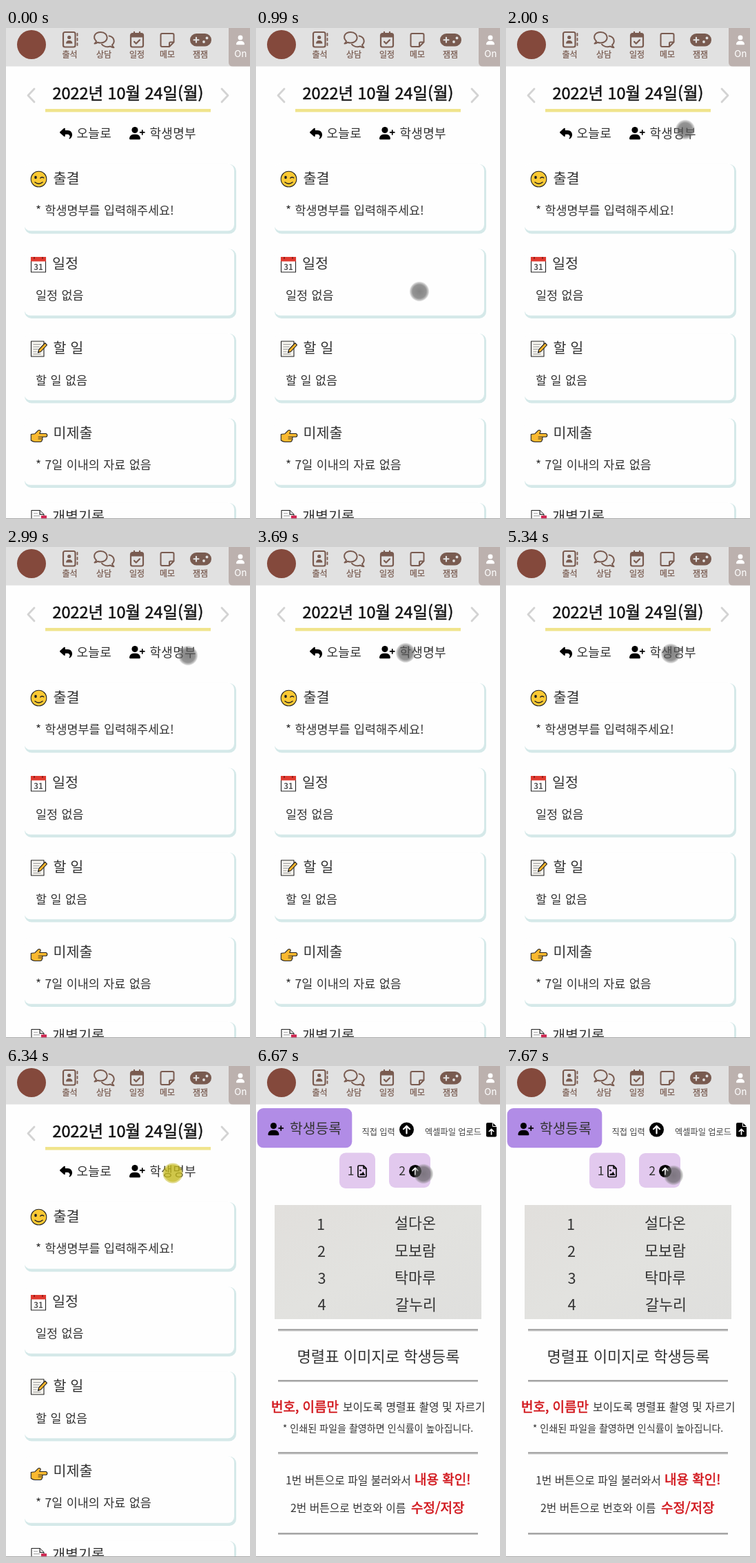
An HTML page that plays this animation: 354x710 px, repeating every 8000 ms.

```html
<!DOCTYPE html>
<html lang="ko">
<head>
<meta charset="utf-8">
<title>학급 일지</title>
<style>
html, body { margin: 0; width: 100%; height: 100%; overflow: hidden; background: #fefefe; }
svg { display: block; width: 354px; height: 710px; }
text { font-family: "Noto Sans CJK KR", "Noto Sans CJK", "Noto Sans CJK JP", sans-serif; font-weight: 300; fill: #333; }
.mid { text-anchor: middle; }
.nav text { font-size: 12px; font-weight: 400; fill: #795b50; stroke: #795b50; stroke-width: .25; text-anchor: middle; }
.nav .on { font-size: 13.5px; font-weight: 300; fill: #fff; stroke: none; }
.line { fill: none; stroke: #795b50; stroke-width: 2.2; stroke-linecap: round; stroke-linejoin: round; }
.brown { fill: #795b50; }
.date { font-size: 23.4px; font-weight: 400; fill: #111; stroke: #111; stroke-width: .5; text-anchor: middle; }
.link { font-size: 18px; letter-spacing: .3px; }
.head { font-size: 20.7px; }
.body { font-size: 17.4px; word-spacing: .6px; }
.small { font-size: 12.2px; fill: #444; }
.note { font-size: 15.8px; }
.red { font-size: 19px; font-weight: 400; fill: #d2181e; stroke: #d2181e; stroke-width: .6; }
.row { font-size: 21.7px; font-weight: 400; text-anchor: middle; }
.ink { stroke: #222; stroke-width: 1.1; stroke-linejoin: round; }

.home, .roster, .cursor, .idle, .press { animation: 8s step-end infinite; }
.home { animation-name: home; }
.roster { animation-name: roster; }
.cursor { animation-name: move; }
.idle { animation-name: idle; }
.press { animation-name: press; }
@keyframes home { 0% { visibility: visible } 83.375%, 100% { visibility: hidden } }
@keyframes roster { 0% { visibility: hidden } 83.375%, 100% { visibility: visible } }
@keyframes idle { 0% { opacity: 1 } 79.25% { opacity: 0 } 83.375%, 100% { opacity: 1 } }
@keyframes press { 0% { opacity: 0 } 79.25% { opacity: 1 } 83.375%, 100% { opacity: 0 } }
@keyframes move {
  0% { opacity: 0; transform: translate(237px, 381px) }
  12.375% { opacity: 1; transform: translate(237px, 381px) }
  16.5% { opacity: 1; transform: translate(266px, 115px) }
  25% { opacity: 1; transform: translate(260px, 147px) }
  29.125% { opacity: 1; transform: translate(215px, 171px) }
  33.25% { opacity: 1; transform: translate(201px, 150px) }
  37.375% { opacity: 1; transform: translate(264px, 157px) }
  42% { opacity: 1; transform: translate(225px, 176px) }
  46.125% { opacity: 1; transform: translate(217px, 153px) }
  50.25% { opacity: 1; transform: translate(254px, 159px) }
  54.375% { opacity: 1; transform: translate(204px, 165px) }
  58.5% { opacity: 1; transform: translate(255px, 141px) }
  62.625% { opacity: 1; transform: translate(231px, 173px) }
  66.75% { opacity: 1; transform: translate(239px, 154px) }
  70.875% { opacity: 1; transform: translate(243px, 156px) }
  79.25% { opacity: 1; transform: translate(242px, 155px) }
  83.375% { opacity: 1; transform: translate(243px, 156px) }
  95.875%, 100% { opacity: 1; transform: translate(243px, 158px) }
}
</style>
</head>
<body>
<svg viewBox="0 0 354 710">
  <defs>
    <g id="user">
      <circle cx="224" cy="128" r="128"/>
      <path d="M0 482C0 384 80 304 178 304h92C368 304 448 384 448 482c0 17-13 30-30 30H30C13 512 0 499 0 482z"/>
    </g>
    <g id="userPlus">
      <use href="#user"/>
      <path d="M440 224H616M528 136V312" fill="none" stroke="#000" stroke-width="48" stroke-linecap="round"/>
    </g>
    <g id="card">
      <rect x="27" y="197" width="307" height="100.500" rx="10" fill="#d5e9e9"/>
      <rect x="26.500" y="196.500" width="304.500" height="96.800" rx="9" fill="#fefefe"/>
    </g>
    <g id="up">
      <circle r="10.500"/>
      <path d="M0 5.500V-5M-4.500 -.8L0 -5.300L4.500 -.8" fill="none" stroke="#fff" stroke-width="2.200" stroke-linecap="round" stroke-linejoin="round"/>
    </g>
    <g id="rule">
      <rect x="32" y="-1.500" width="290" height="3" fill="#c6c6c6"/>
      <rect x="32" y="-1.500" width="290" height="1.500" fill="#999"/>
    </g>
    <linearGradient id="paper" x2="1" y2="1">
      <stop stop-color="#e1dfdc"/><stop offset=".5" stop-color="#e2e2df"/><stop offset="1" stop-color="#dfdfdd"/>
    </linearGradient>
    <radialGradient id="spot">
      <stop stop-color="#555" stop-opacity=".72"/><stop offset=".7" stop-color="#5c5c5c" stop-opacity=".66"/>
      <stop offset=".85" stop-color="#777" stop-opacity=".5"/><stop offset="1" stop-color="#888" stop-opacity=".15"/>
    </radialGradient>
  </defs>

  <rect width="354" height="710" fill="#fefefe"/>

  <g class="home">
    <g fill="none" stroke="#d3d3d3" stroke-width="2.800" stroke-linecap="round" stroke-linejoin="round">
      <path d="M41 88L32 97.500L41 107"/>
      <path d="M313 88L322 97.500L313 107"/>
    </g>
    <text class="date" x="177" y="103.300">2022년 10월 24일(월)</text>
    <rect x="57" y="117" width="240" height="4.500" fill="#f0e48c"/>
    <path transform="translate(78 143.500) scale(.0352)" d="M205 35c12 5 19 16 19 29v64H336c97 0 176 79 176 176c0 113-82 164-100 174c-16 7-28-5-28-18c0-8 4-14 10-19c9-9 22-27 22-57c0-53-43-96-96-96H224v64c0 13-7 24-19 29s-25 3-34-5l-160-144C4 226 0 217 0 208s4-18 11-24l160-144c9-8 22-10 34-5z"/>
    <text class="link" x="102.500" y="158.800">오늘로</text>
    <use href="#userPlus" transform="translate(179 143) scale(.0355)"/>
    <text class="link" x="208.500" y="158.800">학생명부</text>

    <use href="#card"/>
    <use href="#card" y="122.500"/>
    <use href="#card" y="245"/>
    <use href="#card" y="367.500"/>
    <use href="#card" y="490"/>

    <!-- wink -->
    <circle class="ink" cx="47.500" cy="218.500" r="11.300" fill="#fbc934"/>
    <ellipse cx="43" cy="216" rx="1.800" ry="2.300" fill="#222"/>
    <path d="M49.800 217q2.500 -2.300 5 -.3M42 223q5.500 4.500 11 0" fill="none" stroke="#222" stroke-width="1.400" stroke-linecap="round"/>
    <text class="head" x="68.500" y="225">출결</text>
    <text class="body" x="43" y="270.300">* 학생명부를 입력해주세요!</text>

    <!-- calendar -->
    <rect class="ink" x="36.500" y="331.500" width="21" height="21.500" fill="#fff"/>
    <path d="M36 331h22v6.500h-22z" fill="#e0392f"/>
    <path d="M41 331v3M53 331v3" stroke="#7d1712" stroke-width="1.500"/>
    <text class="mid" x="47" y="349.500" style="font-size:11.500px;font-weight:600;fill:#555">31</text>
    <text class="head" x="67" y="348">일정</text>
    <text class="body" x="43" y="393.300">일정 없음</text>

    <!-- memo -->
    <path class="ink" d="M36.500 453h18.500v22h-18.500z" fill="#f6f4ee"/>
    <path d="M39.500 457.500h11M39.500 461h9M39.500 464.500h7M39.500 468h5M39.500 471.500h11" stroke="#9b9b9b" stroke-width="1.100"/>
    <path class="ink" d="M46.500 469.500l1.200 -4.500l9 -9.500l2.800 2.800l-9 9.700z" fill="#f9b52b"/>
    <path d="M46.500 469.500l.8 -2.400l1.700 1.500z" fill="#222"/>
    <text class="head" x="68.500" y="470.300">할 일</text>
    <text class="body" x="43" y="515.500">할 일 없음</text>

    <!-- pointing hand -->
    <path class="ink" d="M36.300 587.500l5.700 -.8l5 -5q3 -.8 3.200 1.500l-1.400 3.300h8.700q2.300 .3 2.300 2.400t-2.300 2.400h-5q1 1.200 .4 2.600q.5 1.500 -.8 2.400q0 2.200 -2.600 2.200h-7.500q-3 -.3 -5.700 -2.300z" fill="#fbb92f"/>
    <path d="M47 591.300h5M47 594h5" stroke="#222" stroke-width=".9" stroke-linecap="round"/>
    <text class="head" x="68.500" y="592.800">미제출</text>
    <text class="body" x="43" y="637.500">* 7일 이내의 자료 없음</text>

    <!-- page with tab -->
    <path class="ink" d="M37 697.500h12l6 6v14h-18z" fill="#fff"/>
    <path class="ink" d="M49 697.500v6h6" fill="#ddd"/>
    <path d="M40 702h6M40 705.500h9" stroke="#9b9b9b" stroke-width="1.100"/>
    <path d="M51 705h8v5h-8z" fill="#cf2c55"/>
    <text class="head" x="67" y="714.300">개별기록</text>
  </g>

  <g class="roster">
    <rect x="1.700" y="61" width="137.600" height="57.300" rx="9" fill="#b18ce6"/>
    <use href="#userPlus" transform="translate(17.500 82) scale(.0355)"/>
    <text x="49" y="97.800" font-size="20.400">학생등록</text>
    <text class="small" x="153.500" y="99.600">직접 입력</text>
    <use href="#up" transform="translate(218.500 92)"/>
    <text class="small" x="245" y="99.600">엑셀파일 업로드</text>
    <path d="M336 82h7.500l5.500 5.500v13q0 2 -2 2h-11q-2 0 -2 -2v-16.500q0 -2 2 -2z"/>
    <path d="M343.500 82v5.500h5.500" fill="none" stroke="#fff" stroke-width="1"/>
    <path d="M341.500 99v-7M338.300 94.500l3.200 -3.200l3.200 3.200" fill="none" stroke="#fff" stroke-width="1.700" stroke-linecap="round" stroke-linejoin="round"/>

    <g fill="#e2c9ee">
      <rect x="121" y="125.500" width="52" height="51.500" rx="9"/>
      <rect x="193" y="126" width="60" height="50" rx="9"/>
    </g>
    <text class="mid" x="137.500" y="158.300" font-size="17.500">1</text>
    <path d="M149.500 144h6.500l4 4v11q0 1.500 -1.500 1.500h-9q-1.500 0 -1.500 -1.500v-13.500q0 -1.500 1.500 -1.500zM156 144v4h4" fill="none" stroke="#000" stroke-width="1.600" stroke-linejoin="round"/>
    <circle cx="151.500" cy="151" r="1.300"/>
    <path d="M150 158l2.300 -3l1 1l2 -3.200l3 5.200z"/>
    <text class="mid" x="212" y="158.300" font-size="17.500">2</text>
    <use href="#up" transform="translate(231 152) scale(.86)"/>

    <rect x="27" y="201" width="300" height="165" fill="url(#paper)"/>
    <g class="row">
      <text x="94" y="237">1</text><text x="231" y="235">설다온</text>
      <text x="95" y="276">2</text><text x="231" y="274.500">모보람</text>
      <text x="95.500" y="315">3</text><text x="231" y="314">탁마루</text>
      <text x="95.500" y="353">4</text><text x="232" y="353">갈누리</text>
    </g>

    <use href="#rule" y="382"/>
    <text class="mid" x="177.500" y="428" font-size="22.100">명렬표 이미지로 학생등록</text>
    <use href="#rule" y="455.500"/>
    <text class="red" x="22" y="499.800">번호, 이름만</text>
    <text class="note" x="126" y="499">보이도록 명렬표 촬영 및 자르기</text>
    <text class="mid" x="177" y="529" font-size="14.100">* 인쇄된 파일을 촬영하면 인식률이 높아집니다.</text>
    <use href="#rule" y="560"/>
    <text class="note" x="43" y="604.500">1번 버튼으로 파일 불러와서</text>
    <text class="red" x="230" y="604.800">내용 확인!</text>
    <text class="note" x="50" y="645">2번 버튼으로 번호와 이름</text>
    <text class="red" x="225" y="645.800">수정/저장</text>
    <use href="#rule" y="676.500"/>
  </g>

  <g class="nav">
    <rect width="354" height="55.500" fill="#e1e1e1"/>
    <circle cx="37" cy="24" r="21" fill="#84493c"/>
    <g class="line">
      <rect x="83" y="6" width="17.500" height="21.500" rx="2.500"/>
      <path d="M103.500 8v3M103.500 15v3M103.500 22v3" stroke-width="1.800"/>
      <path d="M128.500 22.500q2.200 -1.500 2.500 -3.500c-6 -6 -2 -13 6.500 -13c12 0 12.500 15.500 0 15.500q-2.500 0 -4.500 -.8q-2 1.700 -4.500 1.800z" stroke-width="2"/>
      <path d="M149.500 11.500c7 1 9.500 8.500 4.500 13q.5 2 2.500 3.700q-2.800 0 -5 -1.700c-5 1.700 -10.500 .3 -12.500 -3" stroke-width="2"/>
      <rect x="181" y="8" width="18" height="19.500" rx="2.500"/>
      <path d="M186 5.800v3M194 5.800v3M186 19.700l2.800 2.800l5.200 -5.200"/>
      <path d="M226.500 8h15q2 0 2 2v10.500l-6.500 6.500h-10.500q-2 0 -2 -2v-15q0 -2 2 -2zM243.500 20.500h-5q-1.500 0 -1.500 1.500v5" stroke-width="2"/>
    </g>
    <g class="brown">
      <circle cx="91.700" cy="13.500" r="2.600"/>
      <path d="M87 22.500q0 -4.500 4.700 -4.500t4.700 4.500z"/>
      <rect x="181" y="8" width="18" height="5.500"/>
      <rect x="267" y="8" width="31" height="18.500" rx="9.200"/>
    </g>
    <path d="M276 13.700v7M272.500 17.200h7" stroke="#e1e1e1" stroke-width="2.100" stroke-linecap="round"/>
    <g fill="#e1e1e1"><circle cx="287" cy="20" r="1.900"/><circle cx="291.500" cy="14.500" r="1.900"/></g>
    <text x="92.500" y="42.600">출석</text>
    <text x="142" y="42.600">상담</text>
    <text x="190" y="42.600">일정</text>
    <text x="234" y="42.600">메모</text>
    <text x="282" y="42.600">잼잼</text>
    <path d="M323 0h31v55.500h-25q-6 0 -6 -6z" fill="#bcb1ae"/>
    <use href="#user" transform="translate(334 10.500) scale(.0268)" fill="#fff"/>
    <text class="on" x="340.300" y="41.500">On</text>
  </g>
  <rect y="709" width="354" height="1" fill="#a6a6a6"/>

  <g class="cursor">
    <circle class="idle" r="14.200" fill="url(#spot)"/>
    <g class="press" fill="#c3b71c">
      <circle r="14.500" opacity=".5"/>
      <circle r="12.500" opacity=".6"/>
    </g>
  </g>
</svg>
</body>
</html>
```
